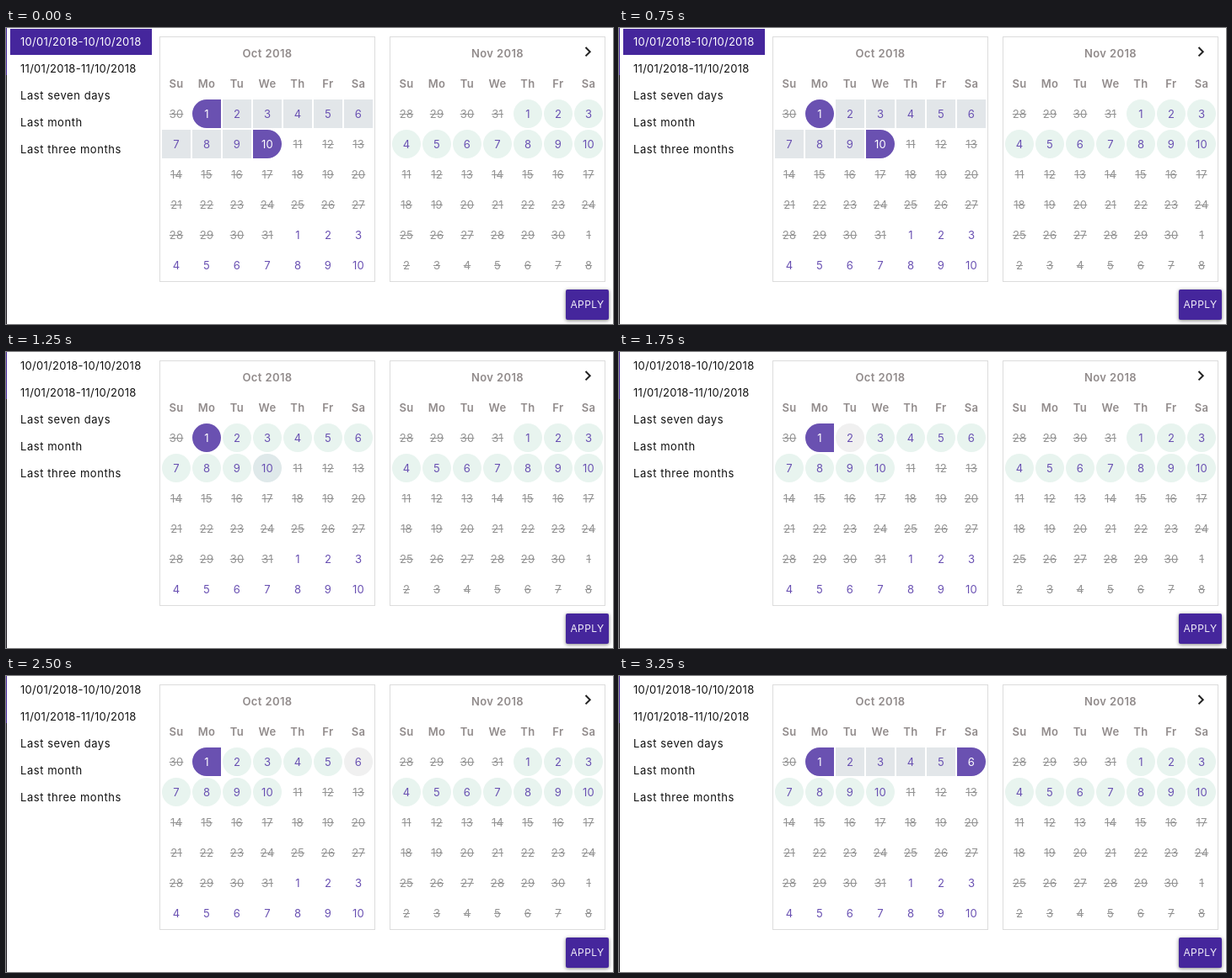
An HTML page that plays this animation: 720x352 px, repeating every 4750 ms.

```html
<!DOCTYPE html>
<html lang="en">
<head>
<meta charset="utf-8">
<title>Date range picker</title>
<style>
  html, body { margin: 0; width: 100%; height: 100%; overflow: hidden; background: #fff; }
  body { position: relative; font: 13px/36px Inter, "Open Sans", sans-serif; color: #111; }
  .edge { position: absolute; left: 0; top: 0; width: 1px; height: 352px;
    background: linear-gradient(#45269c 56px, #1c1820 56px); }
  .presets { position: absolute; left: 5px; top: 1px; width: 168px; line-height: 31px; }
  .presets div { height: 31px; margin-bottom: 1px; padding-left: 12px; letter-spacing: .55px; white-space: nowrap; }
  .presets .dates { letter-spacing: .28px; }
  .presets .on { background: #45269c; color: #fff; }
  .month { position: absolute; top: 10px; width: 254px; height: 290px; border: 1px solid #dcdcdc; }
  .title, .dow { position: absolute; text-align: center; font-weight: 600; letter-spacing: .4px; color: #918b8b; }
  .title { left: 0; top: 1px; width: 254px; }
  .dow { top: 37px; width: 36px; }
  .day { position: absolute; width: 34px; height: 34px; line-height: 34px; text-align: center;
    letter-spacing: .2px; color: #6950b2; }
  .off { color: #939393; text-decoration: line-through; }
  .open { background: #e8f4ef; border-radius: 17px; }
  .range { background: #e2e6e9; }
  .rangeHover { background: #e9ebed; border-radius: 7px; }
  .hover { background: #f0f0f0; border-radius: 17px; }
  .fading { background: #dfe9ea; border-radius: 17px; }
  .start, .end, .both { background: #6a51b1; color: #fff; }
  .start { border-radius: 17px 0 0 17px; }
  .end { border-radius: 0 17px 17px 0; }
  .both { border-radius: 17px; }
  .next { position: absolute; left: 684px; top: 20px; }
  .apply { position: absolute; left: 664px; top: 311px; width: 51px; height: 36px; border-radius: 2px;
    background: #45269c; color: #f1eef8; font-size: 12px; letter-spacing: .4px; text-align: center;
    box-shadow: 0 1px 4px rgba(0, 0, 0, .5); }
</style>
</head>
<body>
<div class="edge"></div>
<div class="presets">
  <div class="dates on" id="preset">10/01/2018-10/10/2018</div>
  <div class="dates">11/01/2018-11/10/2018</div>
  <div>Last seven days</div>
  <div>Last month</div>
  <div>Last three months</div>
</div>
<svg class="next" width="14" height="16"><path d="M3.5 3 8.7 8.2 3.5 13.4" fill="none" stroke="#222" stroke-width="2"/></svg>
<div class="apply">APPLY</div>
<script>
const LOOP = 4750;
const KINDS = {
  g: 'open', i: 'range', h: 'rangeHover', H: 'hover', f: 'fading',
  L: 'start', R: 'end', C: 'both'
};
// [start time, look of October 1 to 10]
const STEPS = [
  [0, 'LiiiiiiiiR'],
  [500, 'LhiiiiiiiR'],
  [750, 'CiiiiiiiiR'],
  [1250, 'Cggggggggf'],
  [1500, 'Cggggggggg'],
  [1750, 'LHgggggggg'],
  [2000, 'LggHgggggg'],
  [2250, 'LggggHgggg'],
  [2750, 'LiiiiCgggg'],
  [3000, 'LiiiiRgggg']
];

function add(parent, cls, text, x, y) {
  const el = document.createElement('div');
  el.className = cls;
  el.textContent = text;
  if (x !== undefined) el.style.left = x + 'px';
  if (y !== undefined) el.style.top = y + 'px';
  parent.append(el);
  return el;
}

// lead: days shown from the month before, prev and len: month lengths
function buildMonth(x, title, lead, prev, len, tailOff) {
  const box = add(document.body, 'month', '', x, 10);
  add(box, 'title', title);
  ['Su', 'Mo', 'Tu', 'We', 'Th', 'Fr', 'Sa'].forEach((d, i) => add(box, 'dow', d, 1 + i * 36));
  const active = [];
  for (let i = 0; i < 42; i++) {
    const n = i - lead + 1;
    const label = n < 1 ? prev + n : n > len ? n - len : n;
    const off = n < 1 || (n > 10 && n <= len) || (n > len && tailOff);
    const cell = add(box, 'day' + (off ? ' off' : ''), label, 2 + i % 7 * 36, 74 + Math.floor(i / 7) * 36);
    if (n >= 1 && n <= 10) active.push(cell);
  }
  return active;
}

const october = buildMonth(182, 'Oct 2018', 1, 30, 31, false);
buildMonth(455, 'Nov 2018', 4, 31, 30, true).forEach(c => c.classList.add('open'));

const preset = document.getElementById('preset');
let shown;
function draw() {
  const t = performance.now() % LOOP;
  const step = STEPS.findLast(s => s[0] <= t);
  if (step !== shown) {
    shown = step;
    october.forEach((c, i) => c.className = 'day ' + KINDS[step[1][i]]);
    preset.classList.toggle('on', step[0] < 1250);
  }
  requestAnimationFrame(draw);
}
draw();
</script>
</body>
</html>
```
